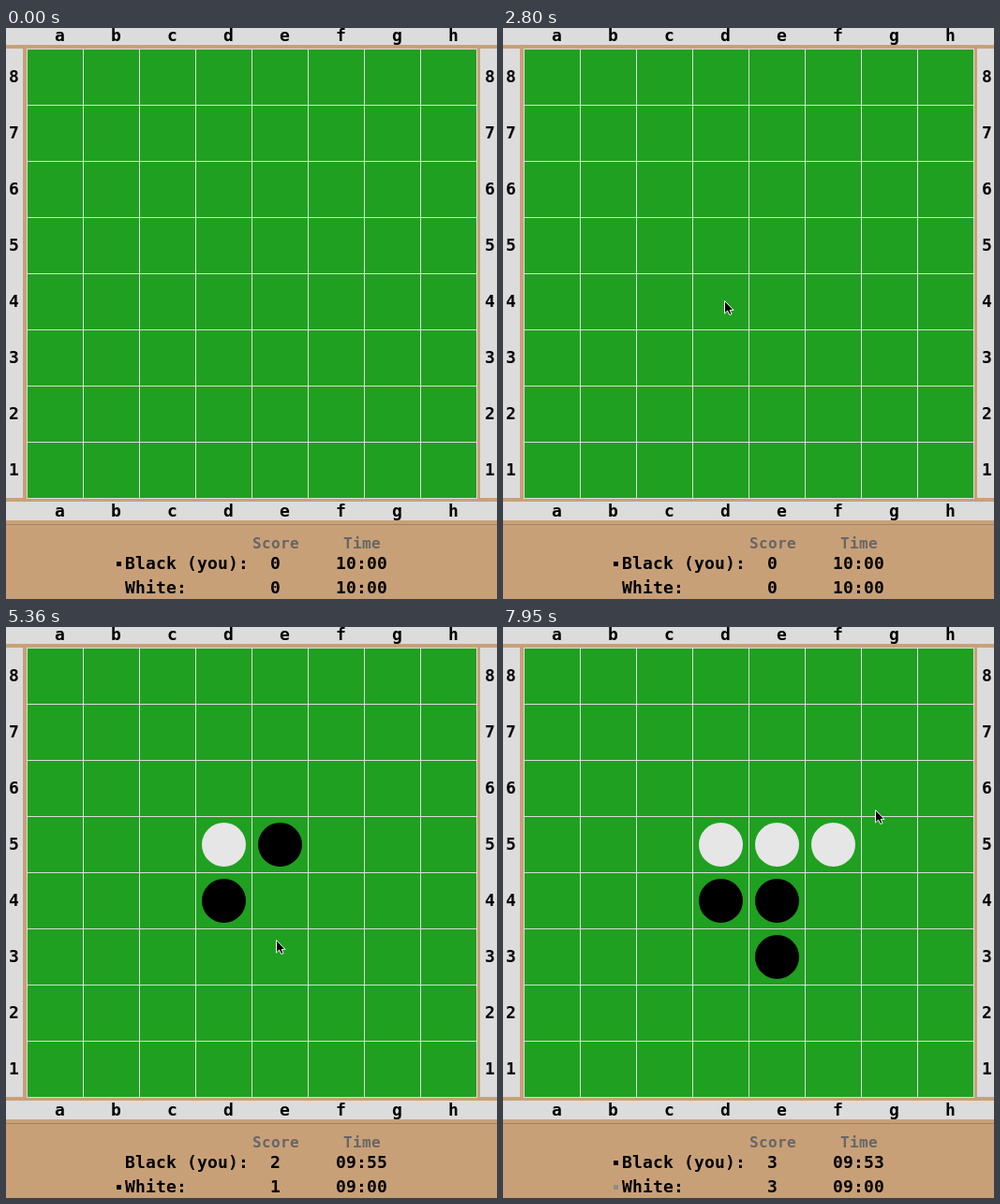
Write an HTML page with a canvas that moves like this. It is 524x610 px and loops after 8000 ms.

```html
<!DOCTYPE html>
<html lang="en">
<head>
<meta charset="utf-8">
<title>Board game</title>
<style>
html, body { margin: 0; height: 100%; overflow: hidden; background: #c8a078; }
canvas { display: block; }
</style>
</head>
<body>
<canvas id="stage" width="524" height="610"></canvas>
<script>
const ctx = document.getElementById('stage').getContext('2d');
const LOOP = 8000, CELL = 60, FILES = 'abcdefgh';
const TAN = '#c8a078', GREY = '#dcdcdc', GREEN = '#20a020';

// Black and white alternate; the clock shown is the mover's
const turns = [
  { t: 2990, at: 'd4', clock: '09:56' },
  { t: 3260, at: 'd5', clock: '09:00' },
  { t: 4760, at: 'e5', clock: '09:55' },
  { t: 5980, at: 'e4', clock: '09:00' },
  { t: 6390, at: 'e3', clock: '09:53' },
  { t: 6730, at: 'f5', clock: '09:00' }
];

// Pointer glides: start, end, x, y, optional bend of the path
const home = { x: 324, y: 552 };
const glides = [
  [30, 790, 230, 221, 2],
  [1130, 1590, 230, 224],
  [1990, 2310, 234, 246],
  [2610, 2850, 236, 296],
  [3430, 3600, 322, 321],
  [3640, 3720, 315, 321],
  [3930, 4390, 300, 227],
  [4640, 4700, 301, 232],
  [4910, 5440, 287, 341],
  [5980, 6110, 292, 355],
  [6150, 6250, 293, 364],
  [7040, 7410, 284, 235],
  [7620, 7940, 397, 195]
];
const clicks = [800, 1940, 2900, 4700, 5570, 6310], CLICK = 50;
const arrow = new Path2D('M.5 .5V14L3.6 11L5.8 15.5L8 14.6L6.2 10.4H10Z');

function rect(color, x, y, w, h) {
  ctx.fillStyle = color;
  ctx.fillRect(x, y, w, h);
}

function circle(color, x, y, r) {
  ctx.fillStyle = color;
  ctx.beginPath();
  ctx.arc(x, y, r, 0, 2 * Math.PI);
  ctx.fill();
}

function text(s, x, y, color = '#000', size = 18, gap = 0.16) {
  ctx.font = `bold ${size}px "DejaVu Sans Mono", monospace`;
  ctx.letterSpacing = gap + 'px';
  ctx.fillStyle = color;
  ctx.fillText(s, x, y);
}

// Places a disc and turns over every enclosed line
function place(discs, x, y, side) {
  discs[[x, y]] = side;
  for (let dx = -1; dx <= 1; dx++) {
    for (let dy = -1; dy <= 1; dy++) {
      const line = [];
      let cx = x + dx, cy = y + dy;
      while (discs[[cx, cy]] === 1 - side) {
        line.push([cx, cy]);
        cx += dx;
        cy += dy;
      }
      if (discs[[cx, cy]] === side) line.forEach(p => discs[p] = side);
    }
  }
}

function gameAt(t) {
  const done = turns.filter(turn => turn.t <= t);
  const discs = {}, clocks = ['10:00', '10:00'];
  done.forEach(({ at, clock }, i) => {
    place(discs, FILES.indexOf(at[0]), 8 - at[1], i % 2);
    clocks[i % 2] = clock;
  });
  return { discs, clocks, count: done.length };
}

function drawBoard() {
  rect(TAN, 0, 0, 524, 610);
  rect(GREY, 0, 0, 524, 18);
  rect(GREY, 0, 506, 524, 20);
  rect(GREY, 0, 22, 18, 480);
  rect(GREY, 506, 22, 18, 480);
  rect('#a58360', 0, 530, 524, 1);
  rect(GREEN, 22, 22, 481, 481);
  for (let i = 0; i <= 8; i++) {
    rect(GREY, 22 + CELL * i, 22, 1, 481);
    rect(GREY, 22, 22 + CELL * i, 481, 1);
  }
  for (let i = 0; i < 8; i++) {
    for (const y of [14, 522]) text(FILES[i], 52 + CELL * i, y);
    for (const x of [3, 511]) text(8 - i, x, 58 + CELL * i);
  }
}

function drawDiscs(discs) {
  for (const key in discs) {
    const [x, y] = key.split(',').map(n => 52.5 + CELL * n);
    circle(['#000', '#e6e6e6'][discs[key]], x, y, 23.5);
  }
}

function drawPanel({ discs, clocks, count }) {
  text('Score', 263, 556, '#666', 16, 0.37);
  text('Time', 360, 556, '#666', 16, 0.37);
  ['Black (you):', 'White:'].forEach((name, side) => {
    const y = 578 + 26 * side;
    text(name, 127, y);
    text(Object.values(discs).filter(d => d === side).length, 282, y);
    text(clocks[side], 352, y);
    if (count % 2 === side) rect('#000', 118, y - 8, 5, 5);
    else if (side) rect(`rgba(100, 128, 136, ${count / 10})`, 118, y - 8, 5, 5);
  });
}

function pointerAt(t) {
  let { x, y } = home;
  for (const [from, to, nx, ny, bend = 1] of glides) {
    const k = Math.min(1, Math.max(0, (t - from) / (to - from)));
    const ease = k * k * (3 - 2 * k);
    x += (nx - x) * ease ** bend;
    y += (ny - y) * ease;
  }
  return [Math.round(x), Math.round(y)];
}

function drawPointer(t) {
  if (t < glides[0][0]) return;
  const [x, y] = pointerAt(t);
  ctx.save();
  ctx.translate(x, y);
  ctx.lineJoin = 'round';
  ctx.fillStyle = '#000';
  ctx.fill(arrow);
  ctx.strokeStyle = '#fff';
  ctx.stroke(arrow);
  ctx.restore();
  if (clicks.some(c => t >= c && t < c + CLICK)) {
    circle('rgba(255, 240, 0, .5)', x + 1, y + 1, 12);
  }
}

function frame(now) {
  const t = now % LOOP, game = gameAt(t);
  drawBoard();
  drawDiscs(game.discs);
  drawPanel(game);
  drawPointer(t);
}

const start = performance.now();
function loop() {
  frame(performance.now() - start);
  requestAnimationFrame(loop);
}
loop();
</script>
</body>
</html>
```
